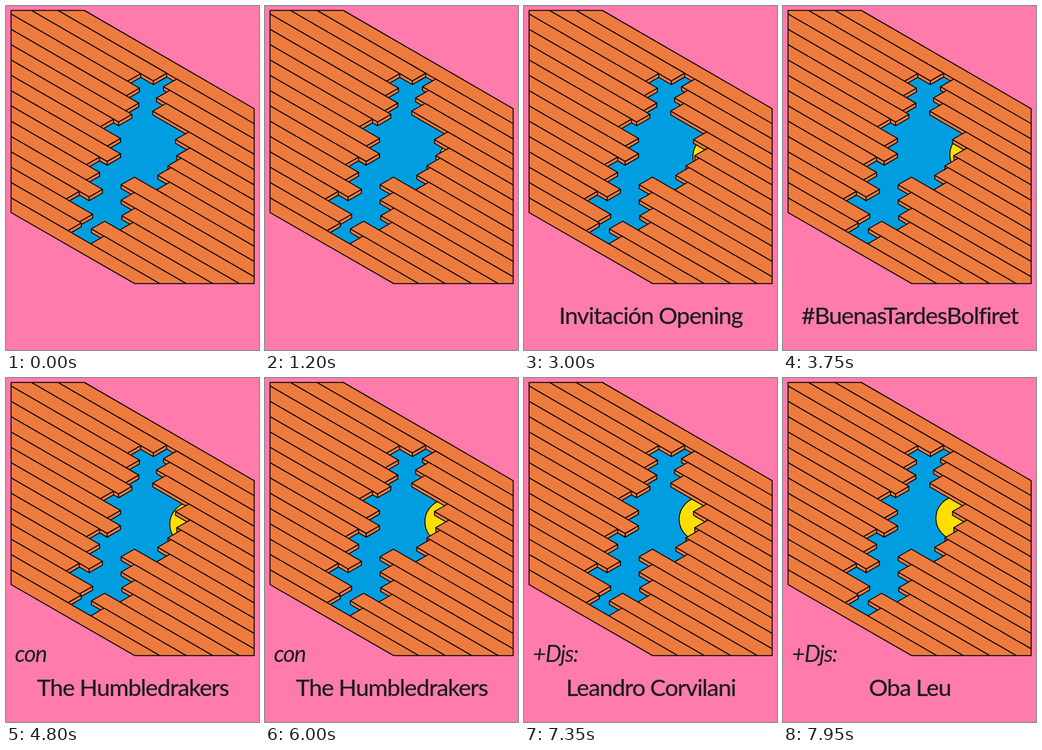
Recreate the animation shown at these times as an HTML page. Size 400x544 px, loop 8 s.

```html
<!DOCTYPE html>
<html lang="es">
<head>
<meta charset="utf-8">
<title>Invitación Opening</title>
<style>
  html, body { margin: 0; width: 100%; height: 100%; overflow: hidden; background: #ff7bac; }
  svg { display: block; width: 400px; height: 544px; }
  .wood { fill: #ee7b3e; }
  .wood, #sun, #frame { stroke: #000; stroke-width: 1.5; stroke-linejoin: round; }
  #frame { fill: none; }
  #sun { fill: #ffde00; }
  text {
    font-family: Lato, "Open Sans", sans-serif; fill: #1d1d1b;
    letter-spacing: -1.2px; font-variant-ligatures: none;
  }
  #main { text-anchor: middle; font-size: 37.5px; font-weight: 500; }
  #intro { font-style: italic; font-size: 36px; }
</style>
</head>
<body>
<svg viewBox="0 0 400 544">
  <defs><clipPath id="hex"><polygon class="outline"/></clipPath></defs>
  <rect width="400" height="544" fill="#ff7bac"/>
  <g clip-path="url(#hex)">
    <rect width="400" height="544" fill="#009ee0"/>
    <circle id="sun" r="35"/>
    <g id="deck"></g>
  </g>
  <polygon id="frame" class="outline"/>
  <text id="intro" x="14" y="449"></text>
  <text id="main" x="200.5" y="503"></text>
</svg>
<script>
const $ = id => document.getElementById(id);
const LOOP = 8000, STEP = 150;
const SLOPE = Math.tan(Math.PI / 6), GAP = 24.22, THICK = 6, CUT = 21;
const FAR = 460, NEAR = -60;

// Seam k between planks, counted from the top edge.
const seam = (k, x) => -60 + GAP * k + SLOPE * (x - 8);
const at = (k, x, drop = 0) => [x, seam(k, x) + drop];

const corners = [[8, 7], [124, 7], [392.4, 162.3], [392.4, 439], [203.5, 439], [8, 326.7]];
document.querySelectorAll('.outline').forEach(p => p.setAttribute('points', corners.join(' ')));

function wood(...points) {
  const p = document.createElementNS('http://www.w3.org/2000/svg', 'polygon');
  p.setAttribute('class', 'wood');
  p.setAttribute('points', points.join(' '));
  $('deck').append(p);
}

// One board of row i between two x positions on its upper seam.
function board(i, x1, x2) {
  const a = x1 - CUT, b = x2 - CUT, k = i + 1;
  wood(at(k, a), at(k, b), at(k, b, THICK), at(k, a, THICK));
  wood(at(i, x2), at(k, b), at(k, b, THICK), at(i, x2, THICK));
  wood(at(i, x1), at(i, x2), at(k, b), at(k, a));
}

// Rows 1 to 14: where the left board ends and the right one begins.
const breaks = [
  [254, 270], [213, 259], [211, 253], [210, 289], [199, 291], [170, 277], [181, 261],
  [181, 259], [148, 203], [148, 203], [152.5, 204], [116, 201], [137, 156], [119, 155]
];
board(0, NEAR, FAR);
breaks.forEach(([end, start], n) => {
  board(n + 1, NEAR, end);
  board(n + 1, start, FAR);
});
board(15, NEAR, FAR);

// start ms, main line, intro
const captions = [
  [0, '', ''],
  [1800, 'Invitación Opening', ''],
  [3300, '#BuenasTardesBolfiret', ''],
  [4800, 'The Humbledrakers', 'con'],
  [6300, 'Leandro Corvilani', '+Djs:'],
  [7800, 'Oba Leu', '+Djs:']
];

function write(id, text) {
  const el = $(id);
  if (el.textContent !== text) el.textContent = text;
}

function draw(time) {
  const t = Math.floor((time % LOOP) / STEP) * STEP;
  // The sun climbs along a shallow curve, flattening to the left.
  const s = t / 1000;
  $('sun').setAttribute('cx', 312.9 - 3.05 * s - 0.189 * s * s);
  $('sun').setAttribute('cy', 251.3 - 4.87 * s + 0.145 * s * s);
  const [, main, intro] = captions.filter(c => c[0] <= t).pop();
  write('main', main);
  write('intro', intro);
}

const begin = performance.now();
function tick() {
  draw(performance.now() - begin);
  requestAnimationFrame(tick);
}
tick();
</script>
</body>
</html>
```
